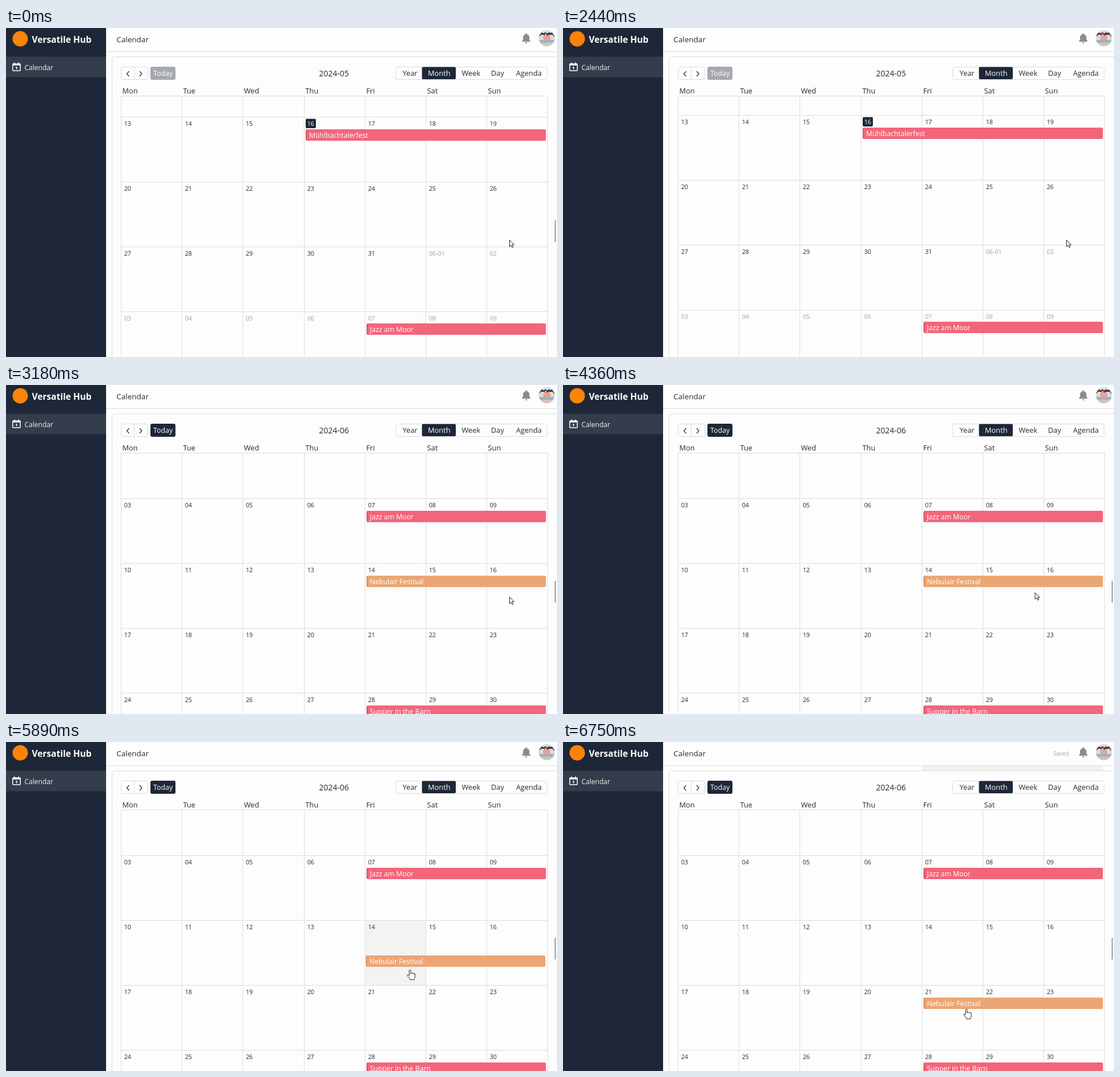
Recreate the animation shown at these times as an HTML page. Size 969 by 578 pixels, loop 8000 ms.

```html
<!DOCTYPE html>
<html lang="en">
<head>
<meta charset="utf-8">
<title>Calendar</title>
<style>
html, body { margin: 0; width: 100%; height: 100%; overflow: hidden; background: #fdfdfd; }
svg { display: block; font: 12.8px "Open Sans", "Noto Sans", sans-serif; fill: #2b2b2b; }
.num { font-size: 10.8px; }
.line { stroke: #dcdcdc; fill: none; }
.event { font-size: 12.2px; fill: #fff; }
</style>
</head>
<body>
<svg id="stage" width="969" height="578" viewBox="0 0 969 578">
  <defs>
    <clipPath id="body"><rect x="202" y="120" width="767" height="458"/></clipPath>
    <clipPath id="round"><circle cx="951" cy="18" r="14"/></clipPath>
  </defs>

  <!-- sidebar -->
  <rect width="176" height="578" fill="#1e2738"/>
  <rect y="50.5" width="176" height="36" fill="#333d4b"/>
  <circle cx="25" cy="19" r="13.5" fill="#fb8408"/>
  <text x="45.5" y="25.5" font-size="15.6" font-weight="700" fill="#fff">Versatile Hub</text>
  <g fill="none" stroke="#fff" stroke-width="1.5">
    <rect x="11.8" y="63" width="13.4" height="12" rx="1"/>
    <path d="M12 64.3H25" stroke-width="3"/>
    <path d="M15 60.5v3M22 60.5v3M17 69h1.7v3.5"/>
  </g>
  <text x="32.5" y="73.7" font-size="12" fill="#f2f2f2">Calendar</text>

  <!-- header -->
  <path class="line" d="M176 41.5H969"/>
  <text x="194.3" y="24.7" font-size="13.5">Calendar</text>
  <text id="saved" x="862" y="23.5" font-size="10" fill="#ababab">Saved</text>
  <path fill="#8b8b8b" d="M907.5 24v-1.2l1.8-2v-4.3c0-3 1.6-4.7 4.3-5.3v-.6a1.3 1.3 0 0 1 2.6 0v.6c2.7.6 4.3 2.3 4.3 5.3v4.3l1.8 2V24zM912.9 25h4a2 2 0 0 1-4 0z"/>
  <g clip-path="url(#round)">
    <rect x="936" y="3" width="30" height="30" fill="#dcdcdc"/>
    <circle cx="951" cy="18" r="6.5" fill="#f0a088"/>
    <rect x="936" y="21" width="30" height="5" fill="#9db3c0"/>
    <rect x="936" y="26" width="30" height="8" fill="#d8c0b8"/>
    <path d="M938 14q3-5 7-3 4-5 7 1 3-6 6-1 5-1 6 4M940 8l8 4M962 8l-8 4" fill="none" stroke="#3a3440" stroke-width="2"/>
  </g>
  <circle cx="951" cy="18" r="14" fill="none" stroke="#d9d9d9"/>

  <!-- panel and toolbar -->
  <rect id="strip" x="631" y="42" width="318" height="8.5" fill="#f1f1f1"/>
  <rect class="line" x="186.5" y="50.5" width="800" height="600" rx="5"/>
  <rect class="line" x="202.5" y="68.5" width="47" height="22" rx="3"/>
  <path class="line" d="M225.5 69V90"/>
  <path d="M216.5 76l-4 4.5 4 4.5M235 76l4 4.5-4 4.5" fill="none" stroke="#333" stroke-width="1.3"/>
  <rect id="today" x="254" y="68" width="44" height="23" rx="3"/>
  <text x="259" y="84" font-size="12.4" fill="#fff">Today</text>
  <text id="title" x="550.6" y="85" font-size="14"></text>
  <rect class="line" x="685.5" y="68.5" width="266" height="22" rx="3"/>
  <rect x="731.5" y="68.5" width="59.5" height="21.5" rx="2" fill="#1e2738"/>
  <g id="views"></g>

  <!-- month grid -->
  <g id="heads"></g>
  <g clip-path="url(#body)">
    <rect id="cell" x="632" width="106" height="113" fill="#f3f3f3"/>
    <g id="weeks"></g>
  </g>
  <path class="line" id="grid"/>
  <g clip-path="url(#body)"><g id="events"></g></g>
  <rect id="thumb" x="965" width="1.5" height="38" fill="#7c7c7c"/>

  <!-- pointers -->
  <path id="arrow" fill="#fff" stroke="#222" stroke-linejoin="round" d="M.5.5V12l2.7-2.5 1.9 4.2 1.9-.8-1.9-4.1h3.5z"/>
  <path id="hand" fill="#fff" stroke="#222" stroke-linejoin="round" d="M-1.5 10.5V1.7a1.4 1.4 0 0 1 2.8 0V7q0-1.2 1.3-1.2T3.9 7q0-1 1.2-1T6.4 7.3q0-.8 1.1-.8t1.1 1.3V12q0 2-1.3 3.5V17.5H-.2V16Q-2.5 13.5-4.6 10.7q-.8-1.4.3-1.9 1-.3 2.8 1.7z"/>
</svg>
<script>
const LOOP = 8000, TOP = 156.7, PITCH = 113.85, EVENT_GAP = 21.1;
const $ = id => document.getElementById(id);
const col = k => Math.floor(202.77 + 107.08 * k);
const rowY = i => TOP + PITCH * i;

function add(parent, tag, attrs, text) {
  const el = document.createElementNS("http://www.w3.org/2000/svg", tag);
  for (const key in attrs) el.setAttribute(key, attrs[key]);
  if (text) el.textContent = text;
  return parent.appendChild(el);
}
const set = (id, key, value) => $(id).setAttribute(key, value);
const show = (id, on) => set(id, "visibility", on ? "visible" : "hidden");
const move = (el, x, y) => el.setAttribute("transform", `translate(${x} ${y})`);

// toolbar views and weekday names
[["Year", 697.5], ["Month", 742], ["Week", 801.5], ["Day", 853], ["Agenda", 897]].forEach(([name, x]) =>
  add($("views"), "text", { x, y: 83.7, fill: name === "Month" ? "#fff" : "#2b2b2b" }, name));
["Mon", "Tue", "Wed", "Thu", "Fri", "Sat", "Sun"].forEach((name, k) =>
  add($("heads"), "text", { x: col(k) + 2.5, y: 114.5 }, name));

let grid = "M202 119.5H952";
for (let k = 0; k < 8; k++) grid += `M${col(k) + .5} 119V578`;
set("grid", "d", grid);

// seven weeks starting on 13 May
const weeks = [], days = [];
for (let i = 0; i < 7; i++) {
  const week = add($("weeks"), "g");
  weeks.push(week);
  add(week, "path", { class: "line", d: "M202 .5H952" });
  for (let k = 0; k < 7; k++) {
    const n = 13 + 7 * i + k, june = n > 31;
    const label = String(june ? n - 31 : n).padStart(2, "0");
    const isToday = n === 16;
    if (isToday) add(week, "rect", { x: 527, y: 3.5, width: 18, height: 16.5, rx: 2, fill: "#1e2738" });
    const el = add(week, "text", { class: "num", x: col(k) + 5.7, y: 16.4 }, n === 32 ? "06-01" : label);
    if (isToday) el.setAttribute("fill", "#fff");
    else days.push({ el, june });
  }
}

const events = [];
function addEvent(name, week, k, fill, edge) {
  const el = add($("events"), "g", { class: "event" });
  const x = col(k) + 3;
  add(el, "rect", { x, width: 12, height: 20, rx: 3, fill: edge });
  add(el, "rect", { x: x + 1.5, width: 949.6 - x - 1.5, height: 20, rx: 2.5, fill });
  add(el, "text", { x: x + 6, y: 14.8 }, name);
  const event = { el, week, dx: 0, dy: 0 };
  events.push(event);
  return event;
}
const pink = ["#f3657b", "#c94e64"];
addEvent("Mühlbachtalerfest", 0, 3, ...pink);
addEvent("Jazz am Moor", 3, 4, ...pink);
addEvent("Supper in the Barn", 6, 4, ...pink);
const dragged = addEvent("Nebulair Festival", 4, 4, "#eba674", "#cb8757");

const part = (t, a, b) => Math.min(1, Math.max(0, (t - a) / (b - a)));
const smooth = p => p * p * (3 - 2 * p);
const easeOut = (p, power) => 1 - (1 - p) ** power;

function draw(t) {
  // wheel scroll from May into June
  const scroll = 298.4 * smooth(part(t, 2400, 3093));
  const june = scroll > 210;
  $("title").textContent = june ? "2024-06" : "2024-05";
  set("today", "fill", june ? "#1e2738" : "#a6a8af");
  for (const d of days) d.el.setAttribute("fill", d.june === june ? "#2b2b2b" : "#a3a3a3");
  set("thumb", "y", 338 + 6 * part(scroll, 119, 298));
  set("thumb", "opacity", t < 720 ? 1 : t < 800 ? .67 : t < 880 ? .33 : t < 2460 ? 0 : 1);

  // pointer glides to the event, then drags it one week down
  const glide = smooth(part(t, 4040, 4890));
  const pull = easeOut(part(t, 5620, 6390), 1.36);
  const dropped = t >= 6710;
  let x = 885 - 173 * glide - 3 * pull;
  let y = 372 - 24 * glide + 117 * pull;
  if (dropped) { x = 709.5; y = 469; }
  const overEvent = y < 355 || t > 5600;
  show("arrow", !overEvent);
  show("hand", overEvent);
  move($("arrow"), x, y);
  move($("hand"), x, y);

  const follow = easeOut(part(t, 5650, 6390), 1.09);
  dragged.dx = dropped ? 0 : -2 * follow;
  dragged.dy = dropped ? PITCH : 115 * follow;

  // weeks and events sit on whole pixels
  weeks.forEach((el, i) => move(el, 0, Math.floor(rowY(i) - scroll)));
  for (const e of events)
    move(e.el, Math.round(e.dx), Math.round(rowY(e.week) + EVENT_GAP - scroll + e.dy));

  show("cell", t >= 5360 && !dropped);
  set("cell", "y", Math.floor(rowY(y > 428 ? 5 : 4) - scroll) + 1);
  show("saved", t >= 6750);
  show("strip", t >= 6750);
}

const start = performance.now();
function frame() {
  draw((performance.now() - start) % LOOP);
  requestAnimationFrame(frame);
}
frame();
</script>
</body>
</html>
```
